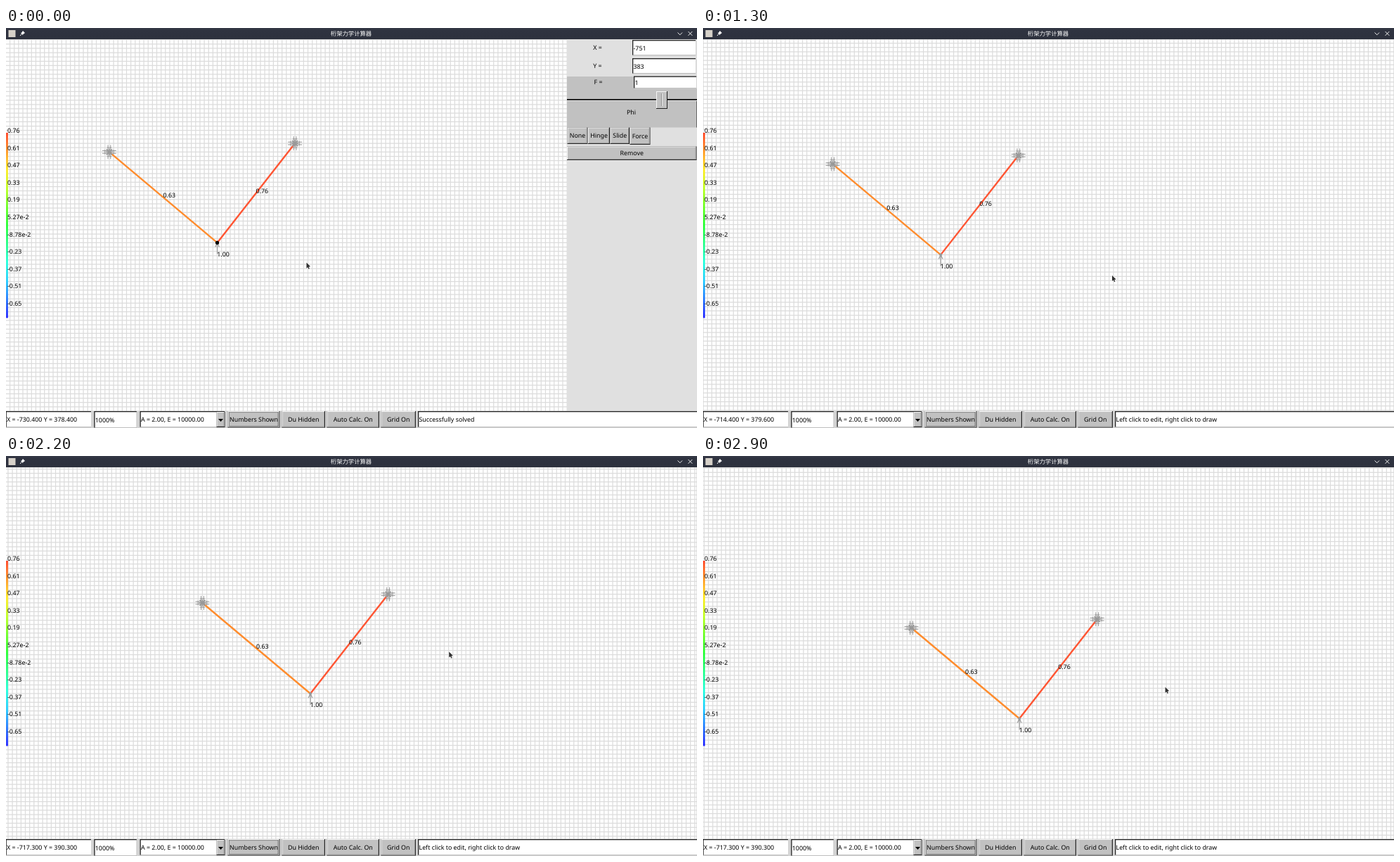
Recreate the animation shown at these times as an HTML page with a canvas. Size 983 px wide and 569 px high, loop 3900 ms.

```html
<!DOCTYPE html>
<html lang="zh">
<head>
<meta charset="utf-8">
<title>桁架力学计算器</title>
<style>
html, body { margin: 0; width: 100%; height: 100%; overflow: hidden; background: #fff; }
canvas { display: block; width: 983px; height: 569px; }
</style>
</head>
<body>
<canvas id="stage" width="983" height="569"></canvas>
<script>
const ctx = document.getElementById('stage').getContext('2d');
const LOOP = 3900, STEP = 100, LAG = 33, DESELECT = 900;
const CELL = 6.144;
const FACE = '#c1c1c1', PALE = '#e0e0e0', SYMBOL = '#999';
const HOME = [427.5, 333.7], JOINT = [300.5, 305.4];

// Pointer path: hovering updates the readout, dragging pans the view.
const moves = [
  { kind: 'hover', start: 0, end: 300, to: [364.8, 316.5] },
  { kind: 'idle', start: 400, end: 600, to: [480.5, 337.5] },
  { kind: 'hover', start: 800, end: 1000, to: [525.8, 326.3] },
  { kind: 'drag', start: 1200, end: 1300, to: [582, 352] },
  { kind: 'drag', start: 1300, end: 1467, to: [675, 387] },
  { kind: 'drag', start: 1500, end: 1567, to: [679.1, 388.8] },
  { kind: 'hover', start: 1800, end: 2000, to: [661.3, 323.1] },
  { kind: 'drag', start: 2100, end: 2275, to: [607, 245] },
  { kind: 'drag', start: 2300, end: 2567, to: [656, 326] },
  { kind: 'drag', start: 2800, end: 2867, to: [657.6, 328.7] }
];

const progress = (move, t) => Math.min(1, Math.max(0, (t - move.start) / (move.end - move.start)));

function pose(t) {
  let cursor = HOME, seen = HOME, pan = [0, 0];
  for (const move of moves) {
    if (t < move.start) break;
    const from = cursor;
    const shift = p => move.to.map((v, i) => (v - from[i]) * p);
    const add = (a, b) => a.map((v, i) => v + b[i]);
    cursor = add(from, shift(progress(move, t)));
    if (move.kind === 'drag') pan = add(pan, shift(progress(move, t - LAG)));
    if (move.kind === 'hover') seen = cursor.map((v, i) => v - pan[i]);
  }
  const reading = [-730.4 + (seen[0] - HOME[0]) / CELL, 378.4 - (seen[1] - HOME[1]) / CELL];
  return { cursor, pan, reading, selected: t < DESELECT };
}

function rect(x, y, w, h, color) {
  ctx.fillStyle = color;
  ctx.fillRect(x, y, w, h);
}

function lines(color, width, ...segments) {
  ctx.strokeStyle = color;
  ctx.lineWidth = width;
  ctx.beginPath();
  for (const [x1, y1, x2, y2] of segments) {
    ctx.moveTo(x1, y1);
    ctx.lineTo(x2, y2);
  }
  ctx.stroke();
}

function shape(color, ...points) {
  ctx.fillStyle = color;
  ctx.beginPath();
  for (const [x, y] of points) ctx.lineTo(x, y);
  ctx.closePath();
  ctx.fill();
}

function dot(x, y, r, color) {
  ctx.fillStyle = color;
  ctx.beginPath();
  ctx.arc(x, y, r, 0, Math.PI * 2);
  ctx.fill();
}

function label(text, x, y, align = 'left') {
  ctx.font = '8.85px "Noto Sans", sans-serif';
  ctx.textAlign = align;
  ctx.fillStyle = '#000';
  ctx.fillText(text, x, y + 3.2);
}

function bevel(x, y, w, h, face, light, dark, edge = 1) {
  rect(x, y, w, h, dark);
  rect(x, y, w - 1, h - 1, light);
  rect(x + edge, y + edge, w - 1 - edge, h - 1 - edge, face);
}

function button(text, x, y, w, h) {
  bevel(x, y, w, h, FACE, '#f4f4f4', '#222');
  lines('#858585', .7, [x + 1, y + h - 1.4, x + w - 1, y + h - 1.4], [x + w - 1.4, y + 1, x + w - 1.4, y + h - 1]);
  label(text, x + w / 2, y + h / 2, 'center');
}

function field(text, x, y, w, h) {
  bevel(x, y, w, h, '#fff', '#222', '#d5d5d5', 1.3);
  label(text, x + 1.5, y + h / 2 + .2);
}

function titleBar() {
  const shade = ctx.createLinearGradient(0, 0, 0, 16);
  shade.addColorStop(0, '#373b48');
  shade.addColorStop(.2, '#2f3340');
  shade.addColorStop(1, '#2d313d');
  rect(0, 0, 983, 16, shade);
  rect(3.5, 3, 10, 10, '#d6d1c9');
  shape('#fff', [24, 4], [27, 7], [24.2, 9], [24, 10.2], [20.8, 7], [22.2, 6.8]);
  lines('#fff', 1, [22.3, 8.7, 20, 11]);
  lines('#eee', 1, [955.5, 6.5, 958.8, 9.8], [958.8, 9.8, 962, 6.5],
    [970.5, 5, 976.3, 10.8], [976.3, 5, 970.5, 10.8]);
  ctx.font = '8.35px "Noto Sans CJK SC", "Noto Sans CJK", sans-serif';
  ctx.textAlign = 'center';
  ctx.fillStyle = '#fff';
  ctx.fillText('桁架力学计算器', 491, 11.2);
}

function grid([px, py]) {
  const first = v => v - Math.ceil(v / CELL) * CELL;
  const marks = [];
  for (let x = first(JOINT[0] + px); x < 983; x += CELL) marks.push([x, 16, x, 545]);
  for (let y = first(JOINT[1] + py); y < 545; y += CELL) marks.push([0, y, 983, y]);
  lines('#dcdcdc', 1.25, ...marks);
}

function hinge(x, y) {
  ctx.save();
  ctx.translate(x, y);
  for (let side = 0; side < 4; side++) {
    lines(SYMBOL, 1.8, [0, 0, 5, 0], [0, 0, 4, 4]);
    lines(SYMBOL, 1, [0, -1.9, 10, -1.9], [0, 1.9, 10, 1.9], [6.3, -3.2, 6.3, 3.2]);
    ctx.rotate(Math.PI / 2);
  }
  ctx.restore();
}

function member(columns, rows, force, color) {
  const dx = columns * CELL, dy = rows * CELL;
  lines(color, 2.4, [0, 0, dx, dy]);
  hinge(dx, dy);
  label(force, dx / 2 - .2, dy / 2 - 2.6);
}

function truss([px, py], selected) {
  ctx.save();
  ctx.translate(JOINT[0] + px, JOINT[1] + py);
  member(-25, -21, '0.63', '#ff8c2d');
  member(18, -23, '0.76', '#ff5533');
  lines(SYMBOL, 1.2, [0, 0, 0, 16], [0, 0, -2.8, 6], [0, 0, 2.8, 6]);
  dot(0, 0, selected ? 2.6 : 2, selected ? '#000' : SYMBOL);
  label('1.00', -.3, 16.2);
  ctx.restore();
}

function legend() {
  const top = 149, height = 263.5;
  const hues = ctx.createLinearGradient(0, top, 0, top + height);
  for (let i = 0; i <= 10; i++) {
    hues.addColorStop(i / 10, `hsl(${8 + 23.2 * i}, 100%, 60%)`);
  }
  rect(0, top, 3, height, hues);
  for (let i = 0; i <= 10; i++) {
    const force = .7552 - .1405 * i;
    label(Math.abs(force) < .1 ? force.toExponential(2) : force.toFixed(2), 2, 146 + 24.55 * i);
  }
}

function sidePanel() {
  rect(798, 16, 185, 529, PALE);
  rect(798, 69, 185, 72.5, FACE);
  label('X =', 841.5, 28, 'center');
  label('Y =', 841.5, 53.7, 'center');
  label('F =', 842.5, 76.8, 'center');
  field('-751', 891, 17, 91, 22.5);
  field('383', 891, 43, 91, 22.5);
  field('1', 893, 68.5, 90, 18);
  rect(798, 101, 185, 1.8, '#000');
  rect(798, 102.8, 185, .8, '#eee');
  bevel(925, 90, 16, 25, FACE, '#f4f4f4', '#222');
  lines('#777', .8, [932.5, 93, 932.5, 111]);
  lines('#fff', .8, [933.4, 93, 933.4, 111]);
  label('Phi', 889.5, 120, 'center');
  lines('#555', .8, [982.5, 104, 982.5, 141.5]);
  button('None', 798.5, 141.5, 29, 23.5);
  button('Hinge', 828, 141.5, 31, 23.5);
  button('Slide', 859.5, 141.5, 27.5, 23.5);
  button('Force', 887.5, 141.5, 29, 24.5);
  button('Remove', 798, 168.5, 184.5, 19.5);
}

function bottomBar([x, y], selected) {
  const top = 545, height = 23.5;
  const readout = v => v.toFixed(1) + '00';
  rect(0, top - .5, 983, 24.5, '#d2d2d2');
  field(`X = ${readout(x)} Y = ${readout(y)}`, -.5, top, 122.5, height);
  field('1000%', 125.3, top, 61.5, height + 1);
  field('A = 2.00, E = 10000.00', 190.5, top, 121.5, height);
  button('', 299.5, top + 1, 12, height - 1.5);
  shape('#000', [302, 556], [309, 556], [305.5, 560]);
  button('Numbers Shown', 315.5, top, 74, height);
  ctx.setLineDash([1, 1]);
  ctx.strokeStyle = '#333';
  ctx.lineWidth = .8;
  ctx.strokeRect(317.5, top + 1.7, 69.5, height - 3.7);
  ctx.setLineDash([]);
  button('Du Hidden', 392.5, top, 61.5, height);
  button('Auto Calc. On', 456.5, top, 74.5, height);
  button('Grid On', 533.5, top, 49.5, height);
  field(selected ? 'Successfully solved' : 'Left click to edit, right click to draw', 586, top, 398, height);
}

function pointer([x, y]) {
  ctx.save();
  ctx.translate(x, y);
  ctx.strokeStyle = '#fff';
  ctx.lineWidth = .9;
  shape('#303030', [0, 0], [0, 8], [1.9, 6.5], [3, 9.2], [4.3, 8.6], [3.1, 6], [5.5, 5.6]);
  ctx.stroke();
  ctx.fill();
  ctx.restore();
}

function draw(t) {
  const { cursor, pan, reading, selected } = pose(Math.floor(t / STEP) * STEP);
  ctx.textRendering = 'geometricPrecision';
  rect(0, 0, 983, 569, '#fff');
  grid(pan);
  lines('#d9d9d9', .8, [0, 16.4, 983, 16.4], [982.6, 16, 982.6, 545]);
  truss(pan, selected);
  legend();
  if (selected) sidePanel();
  titleBar();
  bottomBar(reading, selected);
  pointer(cursor);
}

const start = performance.now();
function tick() {
  draw((performance.now() - start) % LOOP);
  requestAnimationFrame(tick);
}
tick();
</script>
</body>
</html>
```
